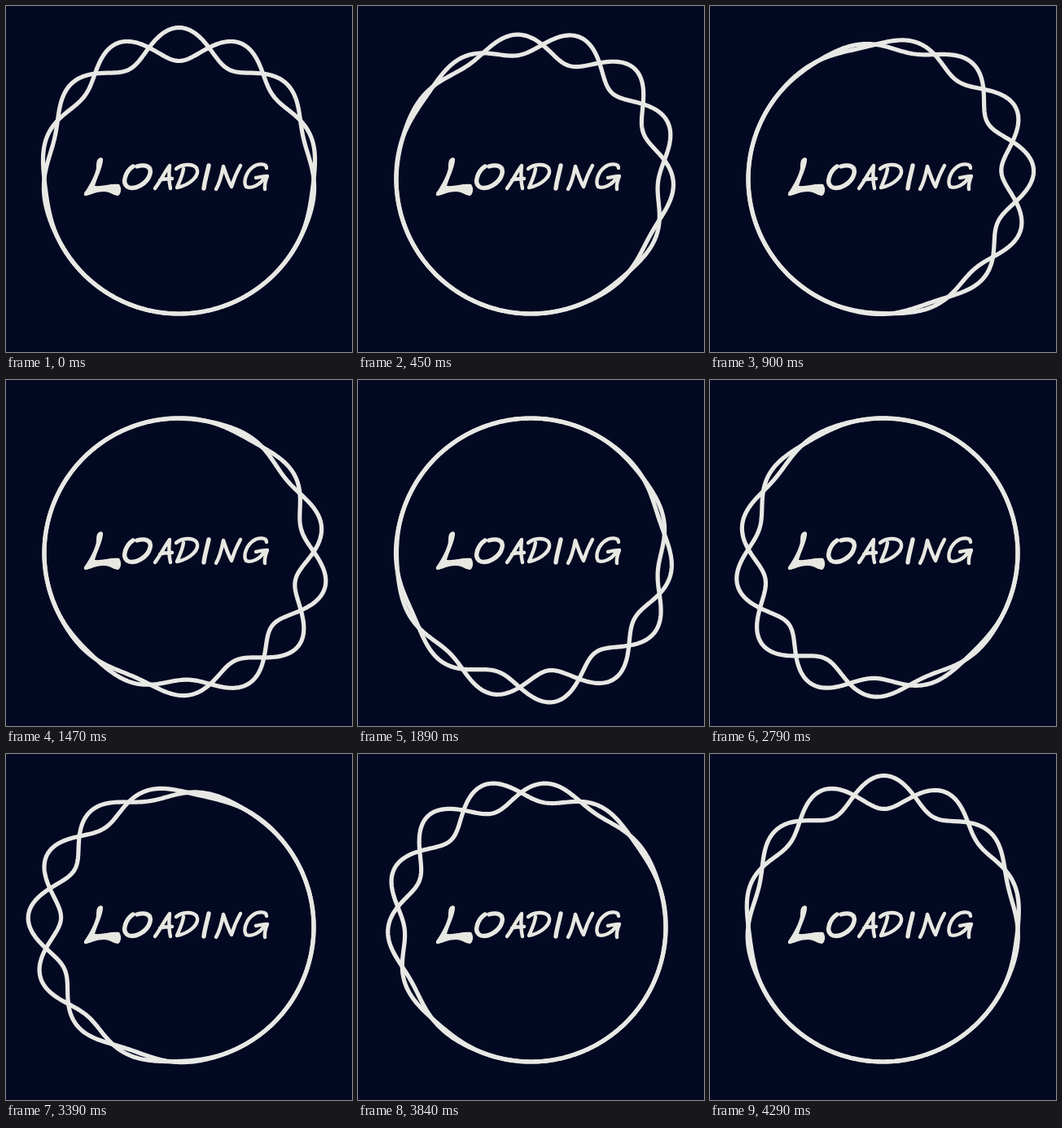
Write an HTML page that moves like this. It is 425 px wide and 425 px high and loops after 4.32 s.

```html
<!DOCTYPE html>
<html lang="en">
<head>
<meta charset="utf-8">
<title>Loading</title>
<style>
  html, body { margin: 0; width: 100%; height: 100%; overflow: hidden; background: #030922; }
  svg { display: block; width: 100%; height: 100%; }
  .line { fill: none; stroke: #e8e8e5; stroke-width: 5.2; stroke-linejoin: round; stroke-linecap: round; }
  .word { fill: none; stroke: #e8e8e2; stroke-width: 4.4; stroke-linejoin: round; stroke-linecap: round; }
  .word .solid { fill: #e8e8e2; stroke: none; }
  .word .bold { stroke-width: 5.4; }
</style>
</head>
<body>
<svg viewBox="0 0 425 425">
  <path class="line" id="waveA"/>
  <path class="line" id="waveB"/>
  <g class="word" role="img" aria-label="Loading">
    <path class="solid" d="M113 188C116 185 120 186 119 190C118 200 112 210 109 221C118 222 128 218 139 219C142 223 142 230 138 233C132 233 128 228 120 228C112 228 106 231 99 233C95 234 95 230 98 227C104 218 109 208 111 199C111 194 111 190 113 188Z"/>
    <path class="bold" d="M156 197C147 203 142 217 149 222C158 227 174 218 177 206C179 197 171 194 161 197"/>
    <path d="M183 224C189 217 194 205 201 196C200 206 200 216 202 224M189 214C194 212 198 212 204 212"/>
    <path d="M218 200C217 208 213 216 210 223M209 200C216 194 229 193 234 199C239 208 226 220 210 223"/>
    <path class="bold" d="M249 196C247 206 244 215 243 224"/>
    <path d="M258 225C263 217 265 207 267 197C270 206 273 215 277 222C280 212 284 203 288 196"/>
    <path d="M320 199C320 193 309 193 303 198C295 204 291 216 295 222C302 225 313 219 317 211M307 211C312 210 316 209 321 209C319 214 317 219 318 225"/>
  </g>
</svg>
<script>
  const LOOP = 4320, STEP = 30;
  const CENTER = 212.5, RADIUS = 165.5, HEIGHT = 20.5;
  const LOBES = 7, POINTS = 480, TAU = Math.PI * 2;
  const waveA = document.getElementById('waveA');
  const waveB = document.getElementById('waveB');

  // The swell turns clockwise while its ripples drift slowly the other way.
  function ring(phase, sign) {
    let d = '';
    for (let i = 0; i < POINTS; i++) {
      const a = i / POINTS * TAU;
      const swell = Math.cos((a - phase * TAU) / 2) ** 6;
      const ripple = Math.cos(LOBES * a + 3 * Math.PI * phase);
      const r = RADIUS + sign * HEIGHT * swell * ripple;
      const x = CENTER + r * Math.sin(a);
      const y = CENTER - r * Math.cos(a);
      d += (i ? 'L' : 'M') + x.toFixed(2) + ' ' + y.toFixed(2);
    }
    return d + 'Z';
  }

  function draw(time) {
    const phase = Math.floor(time % LOOP / STEP) * STEP / LOOP;
    waveA.setAttribute('d', ring(phase, 1));
    waveB.setAttribute('d', ring(phase, -1));
  }

  const start = performance.now();
  function tick() {
    draw(performance.now() - start);
    requestAnimationFrame(tick);
  }
  tick();
</script>
</body>
</html>
```
